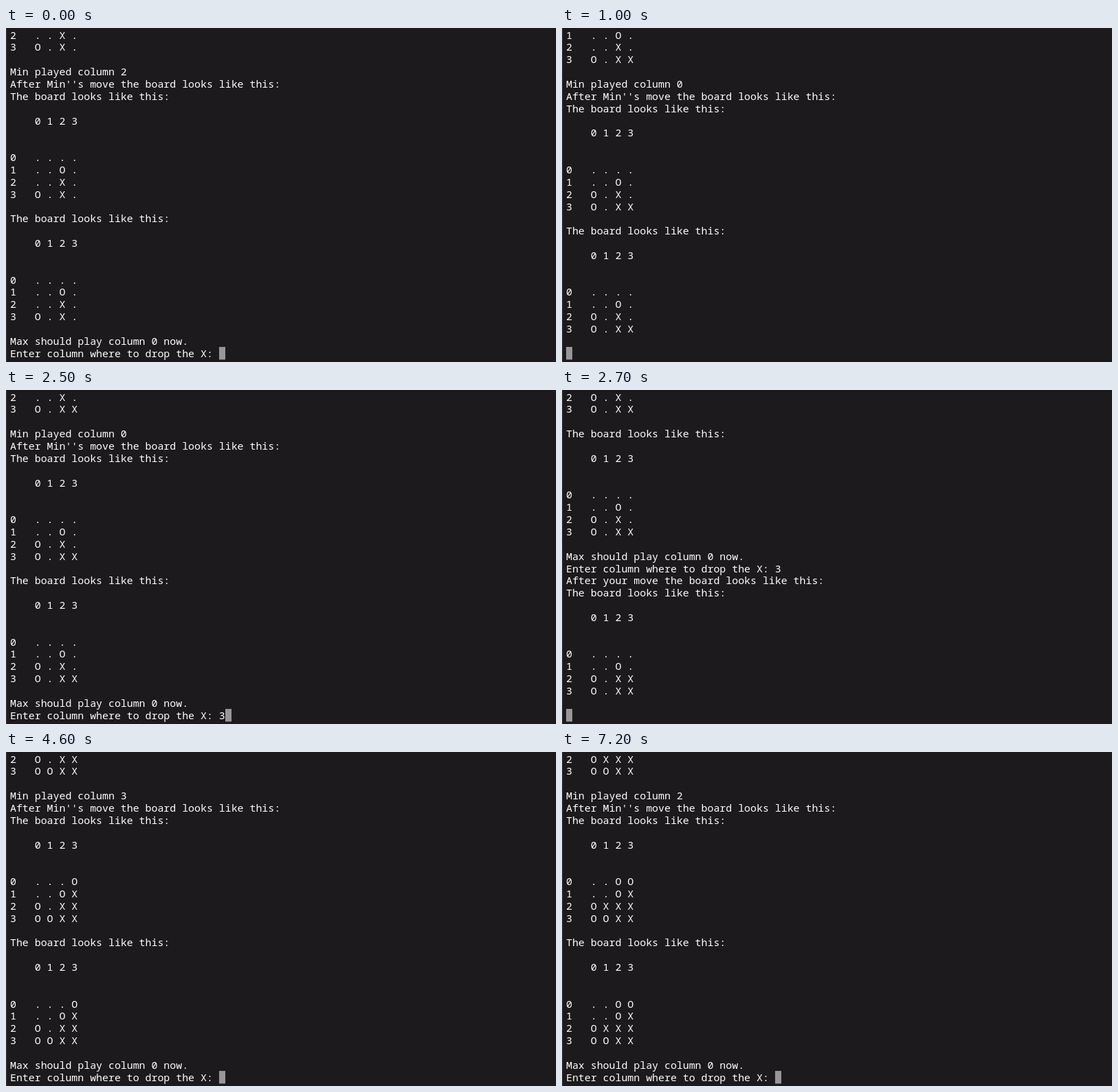
Animation of 800 by 487 pixels, one loop 7.6 s. Source, as an HTML page with a canvas:

```html
<!DOCTYPE html>
<html lang="en">
<head>
<meta charset="utf-8">
<title>Connect game in a terminal</title>
<style>
  html, body { margin: 0; width: 100%; height: 100%; overflow: hidden; background: #1c1a1d; }
  canvas { display: block; }
</style>
</head>
<body>
<canvas id="screen" width="800" height="487"></canvas>
<script>
const ctx = document.getElementById('screen').getContext('2d');
const LOOP = 7600, ROWS = 27;
const FONT_SIZE = 14.9, LEFT = 6, BASELINE = 15.6, LINE_HEIGHT = 17.85;
const PROMPT = 'Enter column where to drop the X: ';

const board = ['....', '....', '..X.', 'O.X.'].map(row => [...row]);
const lines = [];
const scenes = [];

function drop(column, piece) {
  const row = board.findLastIndex(cells => cells[column] === '.');
  board[row][column] = piece;
}

function printBoard() {
  lines.push('The board looks like this:', '', '    0 1 2 3', '', '',
    ...board.map((cells, i) => `${i}   ${cells.join(' ')}`), '');
}

// Keep the visible tail of the log plus the line holding the cursor.
function show(time, current = '') {
  scenes.push({ time, rows: [...lines, current].slice(-ROWS) });
}

function minMove(column) {
  drop(column, 'O');
  lines.push(`Min played column ${column}`, "After Min''s move the board looks like this:");
  printBoard();
  printBoard();
}

function advise(time) {
  lines.push('Max should play column 0 now.');
  show(time, PROMPT);
}

function maxMove(time, column) {
  show(time, PROMPT + column);
  drop(column, 'X');
  lines.push(PROMPT + column, 'After your move the board looks like this:');
  printBoard();
}

printBoard();
minMove(2);
advise(0);

maxMove(400, 3);
show(700);
minMove(0);
show(1000);
advise(1100);

maxMove(2500, 3);
show(2700);
minMove(1);
advise(2800);

maxMove(4300, 3);
minMove(3);
advise(4600);

maxMove(6900, 1);
minMove(2);
advise(7200);

function draw() {
  const time = performance.now() % LOOP;
  const { rows } = scenes.findLast(scene => scene.time <= time);

  ctx.fillStyle = '#1c1a1d';
  ctx.fillRect(0, 0, 800, 487);
  ctx.fillStyle = '#39383a';
  ctx.fillRect(0, 0, 1, 487);

  ctx.font = `500 ${FONT_SIZE}px "Noto Sans Mono", "DejaVu Sans Mono", monospace`;
  const cursorX = LEFT + rows.at(-1).length * ctx.measureText('0').width;
  ctx.fillStyle = '#98969a';
  ctx.fillRect(Math.round(cursorX), 465, 9, 18.5);

  ctx.fillStyle = '#fff';
  rows.forEach((text, i) => ctx.fillText(text, LEFT, BASELINE + i * LINE_HEIGHT));
  requestAnimationFrame(draw);
}
draw();
</script>
</body>
</html>
```
